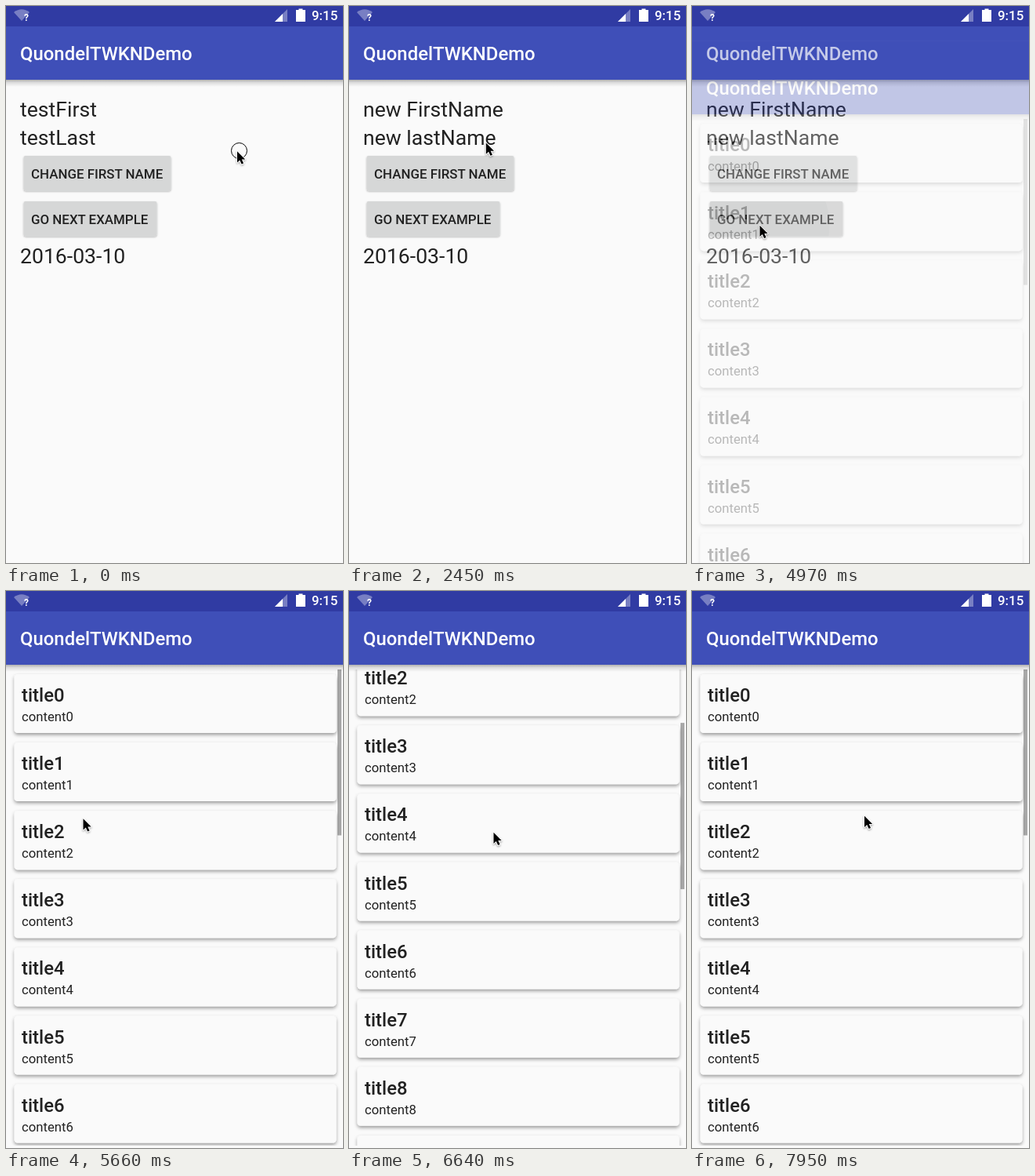
Write an HTML page that moves like this. It is 430 px wide and 710 px high and loops after 8000 ms.

```html
<!DOCTYPE html>
<html lang="en">
<head>
<meta charset="utf-8">
<style>
html, body { margin: 0; width: 100%; height: 100%; overflow: hidden; background: #fafafa; }
svg { display: block; width: 430px; height: 710px; }
text { font-family: Roboto, sans-serif; fill: #212121; white-space: pre; }
.big { font-size: 26.6px; }
.head { font-size: 23.9px; font-weight: 500; }
.btn { font-size: 16.9px; font-weight: 500; }
.body { font-size: 16.7px; }
.white { fill: #fff; }
.face { fill: #d6d7d7; filter: url(#low); }
</style>
</head>
<body>
<svg viewBox="0 0 430 710">
  <defs>
    <linearGradient id="fade" x1="0" y1="0" x2="0" y2="1">
      <stop offset="0" stop-color="#000" stop-opacity=".3"/>
      <stop offset=".4" stop-color="#000" stop-opacity=".12"/>
      <stop offset="1" stop-color="#000" stop-opacity="0"/>
    </linearGradient>
    <filter id="lift" x="-5%" y="-20%" width="110%" height="150%">
      <feDropShadow dx="0" dy="2.4" stdDeviation="2.2" flood-opacity=".38"/>
    </filter>
    <filter id="low" x="-5%" y="-20%" width="110%" height="150%">
      <feDropShadow dx="0" dy="1" stdDeviation="1.1" flood-opacity=".3"/>
    </filter>
    <filter id="soft" x="-50%" y="-50%" width="200%" height="200%">
      <feDropShadow dx="0" dy="1.2" stdDeviation=".9" flood-opacity=".4"/>
    </filter>
    <clipPath id="view"><rect y="100" width="430" height="607"/></clipPath>
    <clipPath id="nextBox"><rect x="22.5" y="249" width="170" height="44.5" rx="2.4"/></clipPath>
    <g id="bar">
      <rect y="94" width="430" height="9" fill="url(#fade)"/>
      <rect width="430" height="94" fill="#3f4fb8"/>
      <text class="head white" x="18" y="69">QuondelTWKNDemo</text>
    </g>
  </defs>

  <g id="home">
    <rect width="430" height="710" fill="#fafafa"/>
    <text class="big" id="first" x="18" y="141"></text>
    <text class="big" id="last" x="18" y="176.7"></text>
    <rect class="face" x="22.5" y="191" width="188" height="44.5" rx="2.4"/>
    <text class="btn" x="32" y="219.5">CHANGE FIRST NAME</text>
    <rect class="face" x="22.5" y="249" width="170" height="44.5" rx="2.4"/>
    <g id="pressed" clip-path="url(#nextBox)">
      <rect x="22" y="249" width="171" height="45" opacity=".05"/>
      <circle id="ripple" cx="87" cy="279" opacity=".03"/>
    </g>
    <text class="btn" x="32" y="277.5">GO NEXT EXAMPLE</text>
    <text class="big" x="18" y="328"></text>
    <text class="big" x="18" y="328">2016-03-10</text>
    <use href="#bar"/>
  </g>

  <g id="page">
    <rect width="430" height="710" fill="#fafafa"/>
    <g clip-path="url(#view)">
      <g id="list"></g>
      <rect id="thumb" x="423" width="5" height="212" opacity=".33"/>
    </g>
    <use href="#bar"/>
  </g>

  <g id="status">
    <rect width="430" height="26" fill="#303ba3"/>
    <path d="M10 8Q20 .5 30 8L20 19Z" fill="#fff" opacity=".35"/>
    <text x="23" y="18.5" class="white" font-size="12" font-weight="700">?</text>
    <path d="M359 4V20H343Z" fill="#fff" opacity=".35"/>
    <path d="M353 10V20H343Z" fill="#fff"/>
    <path d="M370 5H373.5V3.5H378.5V5H382V20H370Z" fill="#fff"/>
    <text class="btn white" x="390" y="18">9:15</text>
  </g>

  <g id="pointer">
    <circle id="ring" cx="2.5" r="10" fill="none" stroke="#000"/>
    <path d="M0 .7v14.2l3.3 -3l2.3 5.2l2.5 -1.1l-2.3 -5.1h4.4Z" stroke="#fff"
      stroke-width="1.6" paint-order="stroke" stroke-linejoin="round" filter="url(#soft)"/>
  </g>
</svg>
<script>
const LOOP = 8000, PITCH = 87.1, CARDS = 20;
const RENAME = 2100, PRESS = 4740, OPEN = 4949;
const $ = id => document.getElementById(id);
const set = (id, name, value) => $(id).setAttribute(name, value);
const show = (id, on) => { $(id).style.display = on ? '' : 'none'; };
const span = (t, from, to) => Math.min(1, Math.max(0, (t - from) / (to - from)));
const smooth = p => p * p * (3 - 2 * p);
const easeOut = (p, n) => 1 - (1 - p) ** n;

// pointer moves: start time, end time, where it goes
const home = [295, 184.5];
const moves = [
  [630, 1280, 129, 210],
  [2340, 3090, 118, 173],
  [3140, 3260, 118.5, 156],
  [3260, 3490, 92, 128],
  [3730, 4020, 86.5, 279],
  [5640, 5660, 98.5, 289.5],
  [5660, 5810, 143, 401],
  [6080, 6110, 186, 513],
  [6110, 6400, 184.5, 307],
  [6640, 7250, 182, 519],
  [7490, 7770, 217, 322],
  [7940, 7950, 220, 286]
];

function pointerAt(t) {
  let [x, y] = home;
  for (const [from, to, toX, toY] of moves) {
    const p = smooth(span(t, from, to));
    x += (toX - x) * p;
    y += (toY - y) * p;
  }
  // one wide sweep around the two names
  const sweep = span(t, 2340, 3090) * Math.PI;
  return [x + 58 * Math.sin(2 * sweep), y - 76 * Math.sin(sweep)];
}

for (let i = 0; i < CARDS; i++) {
  $('list').insertAdjacentHTML('beforeend', `<g transform="translate(0 ${i * PITCH})">
    <rect x="10.5" y="106" width="411" height="75" rx="4.5" fill="#fafafa" filter="url(#lift)"/>
    <text class="head" x="20" y="141">title${i}</text>
    <text class="body" x="20" y="166">content${i}</text></g>`);
}

function draw(t) {
  const [x, y] = pointerAt(t);
  set('pointer', 'transform', `translate(${x} ${y})`);
  show('ring', [0, 1990, PRESS].some(at => t >= at && t < at + 60));

  const renamed = t >= RENAME;
  $('first').textContent = renamed ? 'new FirstName' : 'testFirst';
  $('last').textContent = renamed ? 'new lastName' : 'testLast';
  show('pressed', t >= PRESS);
  set('ripple', 'r', 115 * span(t, PRESS, PRESS + 300));

  // the next screen fades in while it slides up
  show('page', t >= OPEN + 20);
  set('page', 'opacity', easeOut(span(t, OPEN, OPEN + 260), 4));
  set('page', 'transform', `translate(0 ${61 - 61 * easeOut(span(t, OPEN, OPEN + 350), 5)})`);

  // the list follows the drag once it has passed the touch slop
  const scroll = t >= 6110 && t < 7250 ? Math.max(0, 503 - y) : 0;
  set('list', 'transform', `translate(0 ${-scroll})`);
  set('thumb', 'y', 99.5 + scroll * 0.35);
}

const start = performance.now();
function tick() {
  draw((performance.now() - start) % LOOP);
  requestAnimationFrame(tick);
}
draw(0);
requestAnimationFrame(tick);
</script>
</body>
</html>
```
